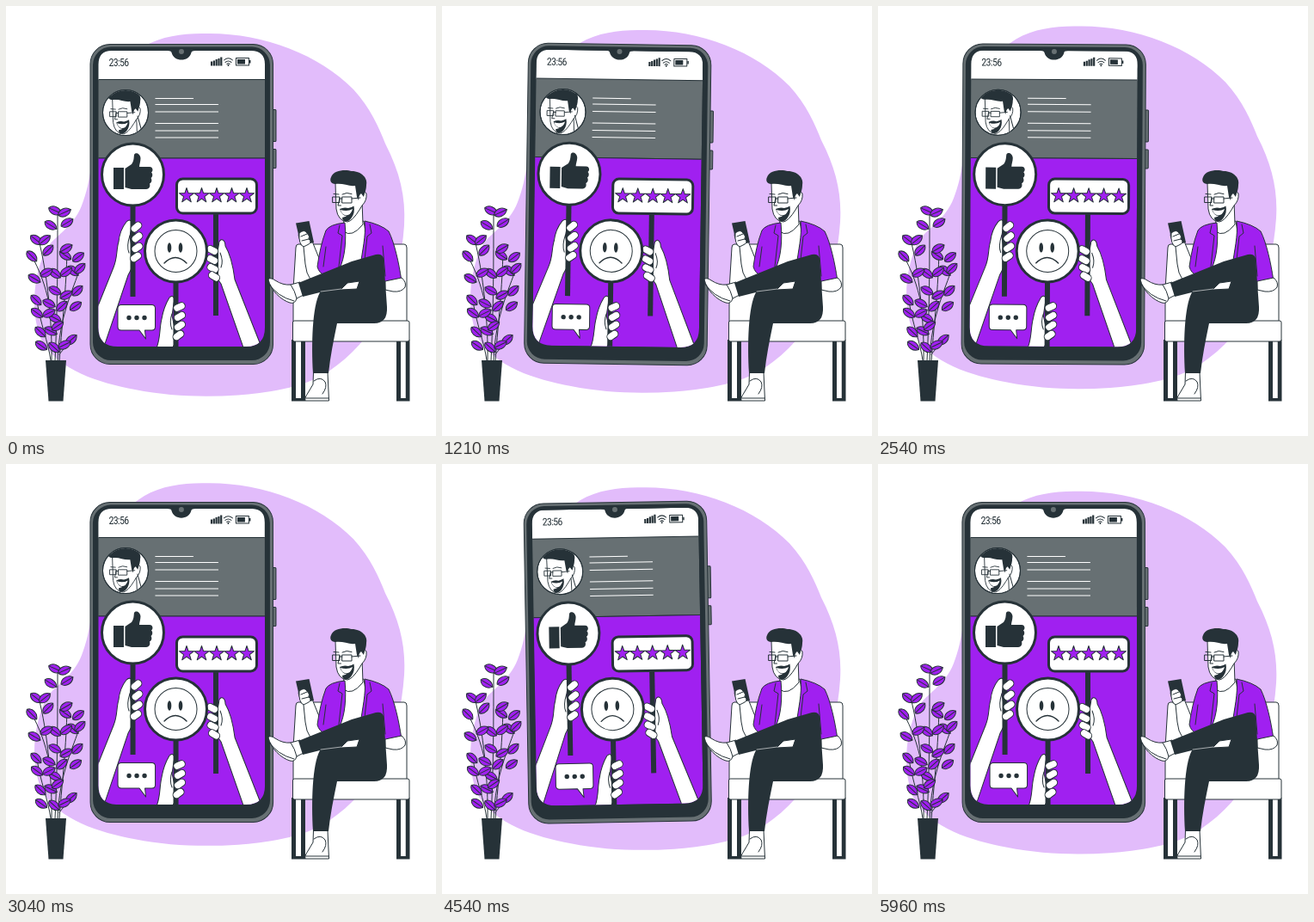
An HTML page for the animation above (6000 ms loop, 500 px wide and 500 px high).

```html
<!DOCTYPE html>
<html lang="en">
<head>
<meta charset="utf-8">
<title>Feedback</title>
<style>
html, body { margin: 0; width: 100%; height: 100%; overflow: hidden; background: #fff; }
svg { display: block; width: 100vw; height: 100vh; }
.l { fill: none; stroke: #263238; stroke-width: 1; stroke-linecap: round; stroke-linejoin: round; }
.w { fill: #fff; stroke: #263238; stroke-width: 1; stroke-linejoin: round; }
.p { fill: #a020f0; stroke: #263238; stroke-width: 1; stroke-linejoin: round; }
.g { fill: #677073; stroke: #263238; stroke-width: 1; }
.d { fill: #263238; }
.sign { fill: #fff; stroke: #263238; stroke-width: 3; }
.time { font: 12px "Roboto Condensed", Roboto, sans-serif; font-stretch: condensed; letter-spacing: -.7px; fill: #263238; }
</style>
</head>
<body>
<svg viewBox="0 0 500 500">
<defs>
  <clipPath id="screen"><path d="M107.500 68Q107.500 52 123 52H285Q301 52 301 68V374Q301 396 279 396H130Q107.500 396 107.500 374Z"/></clipPath>
  <clipPath id="round"><circle cx="139" cy="124" r="26"/></clipPath>
  <rect id="finger" class="w" x="-7" y="-4.200" width="14" height="8.400" rx="4.200"/>
  <path id="star" class="p" d="M0-9L2.100-2.900 8.600-2.800 3.400 1.100 5.300 7.300 0 3.600-5.300 7.300-3.400 1.100-8.600-2.800-2.100-2.900Z"/>
  <g id="leaf">
    <path class="p" d="M-8 0C-5-6 4-6 8 0C4 6-5 6-8 0Z"/>
    <path class="l" d="M-7 0H8"/>
  </g>
  <g id="head">
    <path class="w" d="M393 242L392.500 262Q402 270 415 254L414 226Z"/>
    <path class="w" d="M383 206L384 236Q386 250 397 251Q403 250 411 237L414 232Q420 226 419 218Q416 213 411 219L409 206Z"/>
    <path class="d" d="M378 199C381 190 396 190 402 192C414 192 421 201 419 208C419 214 417 217 416 222L413 218Q410 220 410 226L408 222L406 209C398 210 390 205 383 207C378 207 376 203 378 199Z"/>
    <path class="d" d="M388 236Q393 233.500 398 235Q402 234 404.500 232.500Q406 240 402 246Q399 250.500 395 250.500Q391 250 391 246L396 244.500Q390 243 388 236Z"/>
    <path fill="#fff" d="M389 237Q397 239.500 403 236Q401 243.500 395 243.500Q390 242 389 237Z"/>
    <path class="l" d="M380 222H388V228.500H380ZM391 222H402V229H391ZM388 224H391M402 224L412 223M388 223L386 232H389.500M381 218.500L387 219M391 219Q396 216 402 218.500"/>
  </g>
</defs>

<path id="blob" fill="#e2bcfb" d="M237 32C300 32 365 57 404 97C424 119 434 142 441 160C458 193 465 222 463 255C458 330 430 388 375 425C345 445 300 450 270 452.500C230 455 190 454 150 446C108 438 62 424 42 390C29 362 30 318 46 284C56 267 78 258 88 232C112 176 90 82 168 43C190 33 212 32 237 32Z"/>

<g id="plant">
  <path class="l" d="M57 413C60 350 60 300 60 238M53 413C54 370 48 310 38 272M62 413C66 360 70 330 71 284M60 412C62 360 78 330 86 305M52 412C49 390 40 370 36 343M50 346C46 325 38 305 30 291M62 405L76 388"/>
</g>
<path class="d" d="M46 412H70L66.500 459.500H49.500Z"/>

<g id="phone">
  <rect class="g" x="308" y="120.500" width="6" height="37" rx="1"/>
  <rect class="g" x="308" y="166.500" width="6" height="22" rx="1"/>
  <rect class="g" x="98" y="44.500" width="212.500" height="372" rx="23"/>
  <rect class="d" x="101" y="47.500" width="206" height="364.500" rx="21"/>
  <g clip-path="url(#screen)">
    <path fill="#fff" d="M107 52H301V86H107Z"/>
    <path class="g" d="M106 85.500H302V177H106Z"/>
    <path class="p" d="M106 177H302V397H106Z"/>

    <path class="w" d="M100 366L125 304C130 292 128 284 131 274C132 264 136 256 140 251C144 247 148 250 146 256L144 268L149 298C147 304 144 309 142 313L114 396V402H100Z"/>
    <path class="l" d="M144 267C141 276 141 282 143 287"/>
    <path class="d" d="M144.500 230H150.500V338H144.500Z"/>
    <use href="#finger" transform="translate(151.500 257)rotate(-40)"/>
    <use href="#finger" transform="translate(152.500 269)rotate(-38)"/>
    <use href="#finger" transform="translate(152.500 281)rotate(-35)"/>
    <use href="#finger" transform="translate(151 292)rotate(-35)"/>

    <path class="w" d="M248 274C251 269 255 273 255 279C261 289 264 302 266 318L296 394V400H277L250 323C246 318 243 312 243 306L246 286Z"/>
    <path class="l" d="M249 287C252 294 252 299 250 304"/>
    <path class="d" d="M241 240H247V360H241Z"/>
    <use href="#finger" transform="translate(240 284)rotate(28)"/>
    <use href="#finger" transform="translate(240 295)rotate(28)"/>
    <use href="#finger" transform="translate(240.500 305)rotate(28)"/>
    <use href="#finger" transform="translate(242 314.500)rotate(32)"/>

    <path class="w" d="M174 400C180 388 178 376 181 364C183 352 187 344 190 339C194 335 197 339 195 346L193 360L199 388L192 400Z"/>
    <path class="l" d="M193 358C190 366 191 371 193 376"/>
    <path class="d" d="M194.500 320H200.500V398H194.500Z"/>
    <use href="#finger" transform="translate(201.500 350)rotate(-25)"/>
    <use href="#finger" transform="translate(202 361)rotate(-30)"/>
    <use href="#finger" transform="translate(202 372)rotate(-34)"/>
    <use href="#finger" transform="translate(200.500 383)rotate(-36)"/>
  </g>

  <path class="d" d="M188 49H220V52Q216 52 215.500 54C213 65.500 195 65.500 192.500 54Q192 52 188 52Z"/>
  <circle cx="204" cy="53" r="3" fill="#677073"/>
  <text class="time" x="119.500" y="70">23:56</text>
  <g transform="translate(0 -.5)">
    <path class="d" d="M238 65H240.200V70H238ZM240.800 64H243V70H240.800ZM243.600 62.500H245.800V70H243.600ZM246.400 61.500H248.600V70H246.400ZM249.200 60H251.400V70H249.200Z"/>
    <path class="l" d="M253.500 63.500Q258.500 59 263.500 63.500M255 66Q258.500 63 262 66M256.800 68Q258.500 66.500 260.200 68"/>
    <circle class="d" cx="258.500" cy="69.500" r="1"/>
    <rect class="l" x="267.500" y="61" width="15" height="8.500"/>
    <path class="d" d="M269 62.500H278V68H269ZM283 63.500H284.500V67H283Z"/>
  </g>

  <path stroke="#fff" d="M173.500 107.500H218M173.500 114.500H247M173.500 123H247M173.500 136.500H247M173.500 145H247M173.500 153H247"/>
  <circle class="w" cx="139" cy="124" r="26.500"/>
  <g clip-path="url(#round)">
    <use href="#head" transform="translate(-221 -77)scale(.9)"/>
    <path class="l" d="M153 128L158 146"/>
  </g>
  <circle class="l" cx="139" cy="124" r="26.500"/>

  <circle class="sign" cx="147.500" cy="196" r="36"/>
  <path class="d" d="M125 188H137V213H125ZM138.500 189L146 184C149 180 148.500 176 149 173C150 170 156 171 156.500 177C156.500 181 155 184 155 187H167C171 187 171.500 192 169 193.500C171 195 170.500 199 168.500 200C170 202 169.500 205.500 167 206.500C168 209 167 213 163 213H146L138.500 211Z"/>
  <rect class="sign" x="198.500" y="201" width="93" height="40" rx="7"/>
  <g id="stars"></g>
  <circle class="sign" cx="197.500" cy="285" r="36"/>
  <circle class="l" cx="197.500" cy="285" r="24.500"/>
  <ellipse class="d" cx="190" cy="281" rx="2.300" ry="5.700"/>
  <ellipse class="d" cx="203" cy="281" rx="2.300" ry="5.700"/>
  <path class="l" style="stroke-width:1.400" d="M184 299Q197 286 210 299"/>

  <path class="w" d="M134 347.500H169.500Q173.500 347.500 173.500 351.500V373Q173.500 377 169.500 377H161.500L162.500 387L155 377H134Q130 377 130 373V351.500Q130 347.500 134 347.500Z"/>
  <circle class="d" cx="143" cy="362.500" r="2.700"/>
  <circle class="d" cx="152" cy="362.500" r="2.700"/>
  <circle class="d" cx="161" cy="362.500" r="2.700"/>
</g>

<g id="man">
  <path class="d" d="M332 388H337V456H343V388H348V459.500H332ZM454 388H459V456H464.500V388H469.500V459.500H454Z"/>
  <path fill="#fff" d="M337 388H343V456H337ZM459 388H464.500V456H459Z"/>
  <path class="w" d="M340 277H463Q466 277 466 281V368H334V330L337 281Q337 277 340 277Z"/>
  <rect class="w" x="333.500" y="366" width="135.500" height="24" rx="2"/>

  <path class="w" d="M341 270Q338 262 345 262L354 264L357 276L368 303L370 312L354 318Q349 311 348 300L346 280Z"/>
  <path class="d" d="M337 252.500L352.500 250L358 275L343 278.500Z"/>
  <path class="w" d="M341 264Q347 259 350 264Q354 268 352 271Q356 274 352 277L346 280Q340 277 341 264Z"/>
  <path class="l" d="M343 268L350 265M344 273L352 271"/>

  <path class="w" d="M390 256L416 250L424 300L388 306Z"/>
  <use href="#head"/>
  <path class="p" d="M394 252Q376 254 372 261C367 274 364 289 362 303Q364 311 371 313L388 305C394 292 396 274 394 252Z"/>
  <path class="p" d="M417 250Q436 254 445 262C452 276 457 300 459.500 317L441 321L412 304C414 284 419 268 417 250Z"/>
  <path class="l" d="M388 255L386 264L391 267L387 303M423 254L425 264L420 268L416 304M372 280L369 303M438 279L441 314"/>
  <path class="w" d="M441 320L460 316Q466 321 464 327Q460 333 450 332L441 330Z"/>

  <path class="w" d="M357.500 426H374L375.500 459H348Q347 456 351 450L357 440Z"/>
  <path class="l" d="M349 456H375M358 436Q366 430 371 437Q374 443 368 451"/>
  <path class="w" d="M305 318Q307 315 313 319Q322 325 331 324L342 321L346 336L338 340Q336 347 330 345C320 342 308 331 305 318Z"/>
  <path class="l" d="M305 322Q315 338 335 343M331 324Q336 331 338 340"/>
  <path class="d" d="M340 322L402 297L430 289Q437 287.500 439 293L443 350Q444 369 428 369H385C381 388 377 408 375 427H357C355 393 356 350 365 333L345 338Z"/>
  <path class="w" d="M389 330L397 322L411 320L408 329Z"/>
  <path class="l" style="stroke:#fff;stroke-width:.6" d="M366 332L390 329"/>
</g>
</svg>
<script>
const $ = id => document.getElementById(id);
const uses = (id, spots) => spots.map(t => `<use href="#${id}" transform="${t}"/>`).join('');

// Leaves lean up and away from their stem
const left = [[57, 238], [52, 255], [35, 272], [30, 291], [33, 317], [57, 311], [35, 342], [57, 331],
  [36, 357], [40, 379], [57, 363], [41, 395], [56, 397], [50, 346], [69, 290], [78, 308], [52, 378]];
const right = [[68, 240], [71, 252], [45, 272], [49, 284], [70, 282], [84, 292], [86, 305], [47, 310],
  [70, 309], [83, 331], [70, 336], [81, 349], [65, 349], [50, 357], [60, 372], [76, 388], [68, 394]];
const lean = side => ([x, y], i) => `translate(${x} ${y})rotate(${side * (24 + i * 7 % 22)})`;
$('plant').innerHTML += uses('leaf', [...left.map(lean(1)), ...right.map(lean(-1))]);
$('stars').innerHTML = uses('star', [0, 1, 2, 3, 4].map(i => `translate(${210 + i * 17.5} 220.500)`));

function draw() {
  const a = performance.now() % 6000 / 6000 * 2 * Math.PI;
  // Triangle waves: the blob rises 10px and returns, the phone sways by one degree
  const rise = -10 * Math.acos(Math.cos(a)) / Math.PI;
  const sway = Math.asin(Math.sin(a)) * 2 / Math.PI;
  $('blob').setAttribute('transform', `translate(0 ${rise})`);
  $('phone').setAttribute('transform', `rotate(${sway} 206 230.5)`);
  requestAnimationFrame(draw);
}
draw();
</script>
</body>
</html>
```
